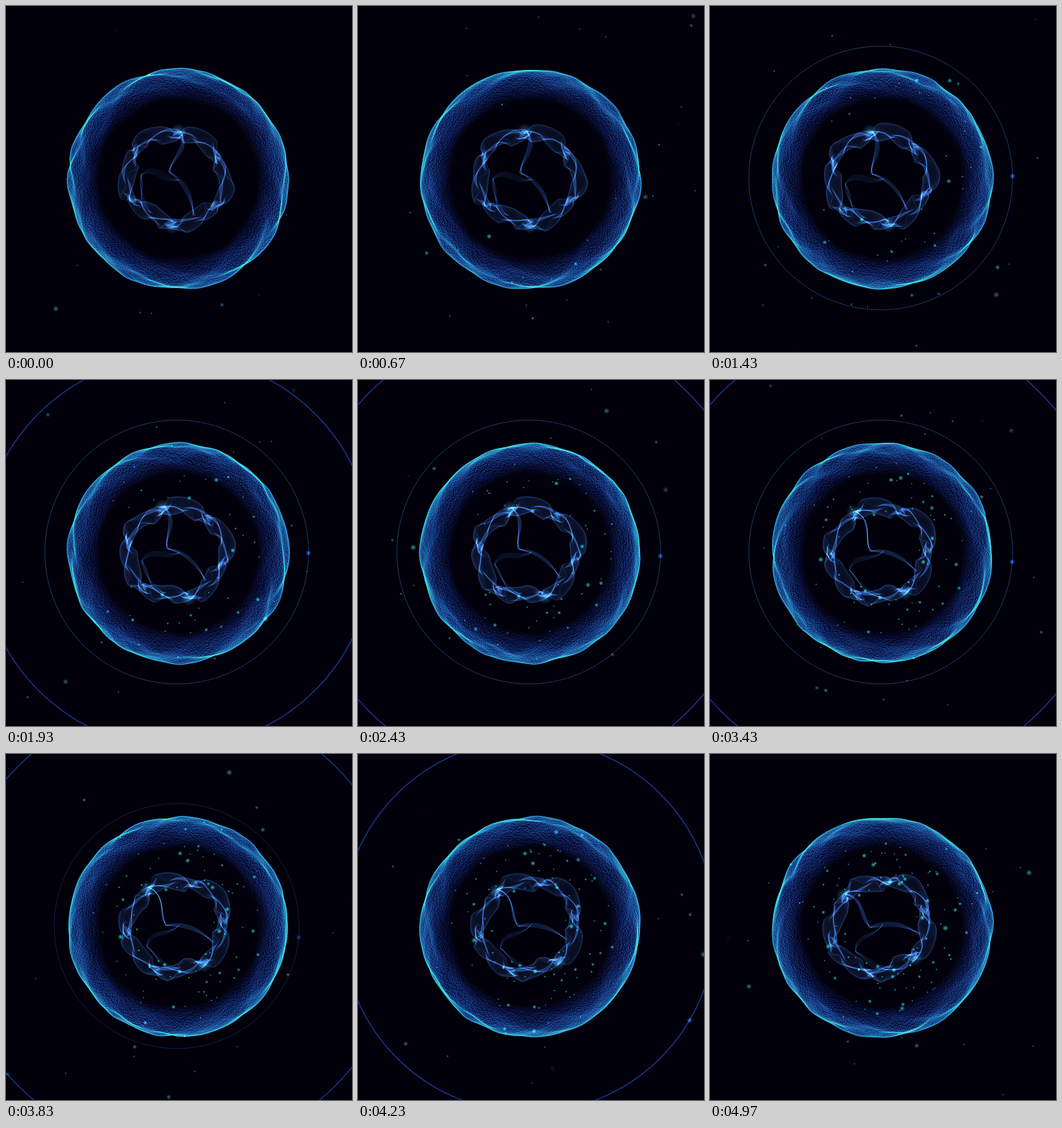
These frames come from a looping animation (525x525 px, 5010 ms). An HTML page with a canvas:

```html
<!DOCTYPE html>
<html lang="en">
<head>
<meta charset="utf-8">
<title>Particle cell</title>
<style>
  html, body { margin: 0; width: 100%; height: 100%; overflow: hidden; background: #02000a; }
  canvas { display: block; width: 100vw; height: 100vh; }
</style>
</head>
<body>
<canvas id="stage" width="525" height="525"></canvas>
<script>
const LOOP = 5010, SIZE = 525, TAU = Math.PI * 2;
const { sin, cos, exp, min, max, abs } = Math;
const ctx = document.getElementById('stage').getContext('2d');

const clamp = v => max(0, min(1, v));
const ramp = (t, a, b) => { const u = clamp((t - a) / (b - a)); return u * u * (3 - 2 * u); };

function seeded(seed) {
  return () => {
    seed = (seed * 1664525 + 1013904223) >>> 0;
    return seed / 4294967296;
  };
}
const rnd = seeded(71);

// ---- Shell: points near the limb of a rippling sphere ----
const BOX = 374, LEFT = 74, TOP = 75, HALF = BOX / 2, RADIUS = 166;
const ROWS = 64, COLS = 620, SPAN = 0.77;
const shell = [];
for (let i = 0; i < ROWS; i++) {
  for (let j = 0; j < COLS; j++) {
    const lat = ((i + rnd()) / ROWS * 2 - 1) * SPAN;
    const a = (j + (i % 2) / 2) / COLS * TAU;
    shell.push({
      x: cos(lat) * cos(a), y: cos(lat) * sin(a), z: sin(lat),
      weight: 0.95 * (1 - abs(lat / SPAN) ** 2.6)
    });
  }
}
const density = new Float32Array(BOX * BOX);
const image = new ImageData(BOX, BOX);

// Colour ramp from deep blue to cyan-green by density
const STEP = 64;
const tones = Array.from({ length: 8 * STEP }, (_, i) => {
  const v = i / STEP;
  return [
    2 + 72 * (1 - exp(-0.45 * v)),
    228 * (1 - exp(-0.32 * v - 0.12 * v * v)),
    10 + 200 * (1 - exp(-1.25 * v))
  ];
});

function ripple(p, t) {
  const warp = 1.3 * sin(4 * p.x - 3 * p.y + t);
  return 0.0075 * (
    sin(11 * p.x + 6 * p.y + 9 * p.z - 1.9 * t + warp) +
    sin(11 * p.y - 6 * p.x - 12 * p.z + 1.7 * t + warp) +
    0.8 * sin(9 * (p.x - p.y) + 14 * p.z + 2.2 * t)) +
    0.0025 * sin(19 * (p.x + p.y) - 16 * p.z - 2.5 * t);
}

function drawShell(t) {
  density.fill(0);
  for (const p of shell) {
    const r = RADIUS * (1 + ripple(p, t));
    const x = HALF + p.x * r, y = HALF + p.y * r;
    const ix = x | 0, iy = y | 0, fx = x - ix, fy = y - iy;
    const k = iy * BOX + ix, w = p.weight;
    density[k] += w * (1 - fx) * (1 - fy);
    density[k + 1] += w * fx * (1 - fy);
    density[k + BOX] += w * (1 - fx) * fy;
    density[k + BOX + 1] += w * fx * fy;
  }
  const d = image.data;
  for (let i = 0, k = 0; i < density.length; i++, k += 4) {
    const c = tones[min(tones.length - 1, density[i] * STEP | 0)];
    d[k] = c[0]; d[k + 1] = c[1]; d[k + 2] = c[2]; d[k + 3] = 255;
  }
  ctx.putImageData(image, LEFT, TOP);
}

function glow(x, y, r, rgb, alpha) {
  const g = ctx.createRadialGradient(x, y, 0, x, y, r);
  g.addColorStop(0, `rgba(${rgb},${alpha})`);
  g.addColorStop(0.4, `rgba(${rgb},${alpha * 0.55})`);
  g.addColorStop(1, `rgba(${rgb},0)`);
  ctx.fillStyle = g;
  ctx.fillRect(x - r, y - r, r * 2, r * 2);
}

// ---- Core: a turning ring of fine lines, pinched at six knots ----
const KNOTS = 6, FIRST = -1.5, TURN = -0.186, CORE_R = 71;
const LINES = 46, SEGMENTS = 260;

function coreLine(u, t) {
  const w = u * TAU;
  ctx.beginPath();
  for (let i = 0; i <= SEGMENTS; i++) {
    const a = i / SEGMENTS * TAU, k = a - FIRST;
    const open = 3 + 10 * abs(sin(k * KNOTS / 2)) ** 0.8;
    const r = CORE_R + 4 * sin(2 * a + 1) + 3 * sin(5 * a + 0.3 * t) +
      open * (0.75 * sin(w + 2 * a + 0.3 * t) + 0.4 * sin(2 * w - 7 * a + 0.4 * t));
    const slip = 0.075 * sin(w + 9 * a - 0.4 * t) + 0.055 * sin(2 * w + 13 * a + 0.3 * t) - 0.1 * sin(KNOTS * k);
    ctx.lineTo(r * cos(a + slip), r * sin(a + slip));
  }
  ctx.stroke();
}

// A bundle of curves through the middle, bent by two control points
function strand(from, c1, c2, to, count, spread, t) {
  for (let j = 0; j < count; j++) {
    const u = j / (count - 1) - 0.5, s = spread * u;
    ctx.beginPath();
    ctx.moveTo(...from);
    ctx.bezierCurveTo(
      c1[0] + s * sin(0.5 * t + 1), c1[1] + s,
      c2[0] - s, c2[1] + s * cos(0.4 * t), to[0] + s * 0.3, to[1]);
    ctx.stroke();
  }
}

function drawCore(t) {
  ctx.save();
  ctx.translate(257, 262);
  ctx.rotate(TURN * t);
  ctx.lineWidth = 0.7;
  ctx.strokeStyle = 'rgba(50,112,200,0.2)';
  for (let j = 0; j < LINES; j++) coreLine(j / LINES, t);
  ctx.strokeStyle = 'rgba(50,112,200,0.26)';
  strand([8, -72], [22, -45], [-8, -30], [-9, -10], 10, 16, t);
  strand([-9, -10], [5, 0], [24, 15], [28, 56], 9, 14, t);
  strand([-52, -6], [-30, -22], [-20, 4], [6, 2], 5, 12, t);
  strand([-52, -6], [-50, 20], [-58, 34], [-36, 52], 7, 18, t);
  for (let i = 0; i < KNOTS; i++) {
    const a = FIRST + i * TAU / KNOTS, main = i % 3 === 0;
    glow(72 * cos(a), 72 * sin(a), main ? 12 : 7, '70,165,220', main ? 0.5 : 0.28);
  }
  ctx.restore();
}

// ---- Rings ----
function ring(r, alpha, width, color) {
  if (alpha <= 0) return;
  ctx.globalAlpha = alpha;
  ctx.lineWidth = width;
  ctx.strokeStyle = color;
  ctx.beginPath();
  ctx.arc(259, 261, r, 0, TAU);
  ctx.stroke();
  ctx.globalAlpha = 1;
}

function ringDot(r, a, alpha) {
  if (alpha > 0) glow(259 + r * cos(a), 261 + r * sin(a), 4.5, '45,105,225', alpha);
}

function drawRings(t) {
  const show = ramp(t, 0.85, 1.25) * (1 - ramp(t, 3.6, 4.1));
  const inner = 168 + 32 * (ramp(t, 0.85, 1.3) - ramp(t, 3.6, 4.1));
  ctx.setLineDash([2, 1]);
  ring(inner, show, 1, 'rgb(34,84,150)');
  ctx.setLineDash([]);
  ringDot(inner, 0.045 * (t - 1.75), show);

  const far = ramp(t, 1.5, 1.9) * (1 - ramp(t, 4.3, 4.75));
  const outer = 205 + 137 * (ramp(t, 1.5, 2.2) - ramp(t, 3.8, 4.75));
  ring(outer, far, 1.6, 'rgb(24,50,128)');
  ringDot(outer, 0.53 + 0.045 * (t - 4.23), far);
}

// ---- Specks: drawn in from afar, settling into orbits around the core ----
const specks = Array.from({ length: 125 }, () => ({
  born: -0.9 + 5.8 * rnd(),
  start: 190 + 190 * rnd(), orbit: 55 + 75 * rnd(),
  angle: TAU * rnd(), spin: -0.1 - 0.2 * rnd(),
  pull: 0.7 + 0.7 * rnd(), size: 0.9 + 2.2 * rnd() ** 4
}));

function drawSpecks(t) {
  for (const p of specks) {
    const age = t - p.born;
    if (age <= 0) continue;
    const far = exp(-p.pull * age * age);
    const r = p.orbit + (p.start - p.orbit) * far;
    const a = p.angle + p.spin * age;
    const tint = [65 - 30 * (1 - far), 130 + 85 * (1 - far), 165 + 25 * (1 - far)].map(Math.round);
    glow(261 + r * cos(a), 262 + r * sin(a), p.size * (1.5 + 0.4 * far), tint, ramp(age, 0, 0.35) * (0.95 - 0.25 * far));
  }
}

function frame() {
  const t = performance.now() % LOOP / 1000;
  ctx.globalCompositeOperation = 'source-over';
  ctx.fillStyle = '#02000a';
  ctx.fillRect(0, 0, SIZE, SIZE);
  drawShell(t);
  ctx.globalCompositeOperation = 'lighter';
  drawCore(t);
  drawRings(t);
  drawSpecks(t);
  requestAnimationFrame(frame);
}
frame();
</script>
</body>
</html>
```
